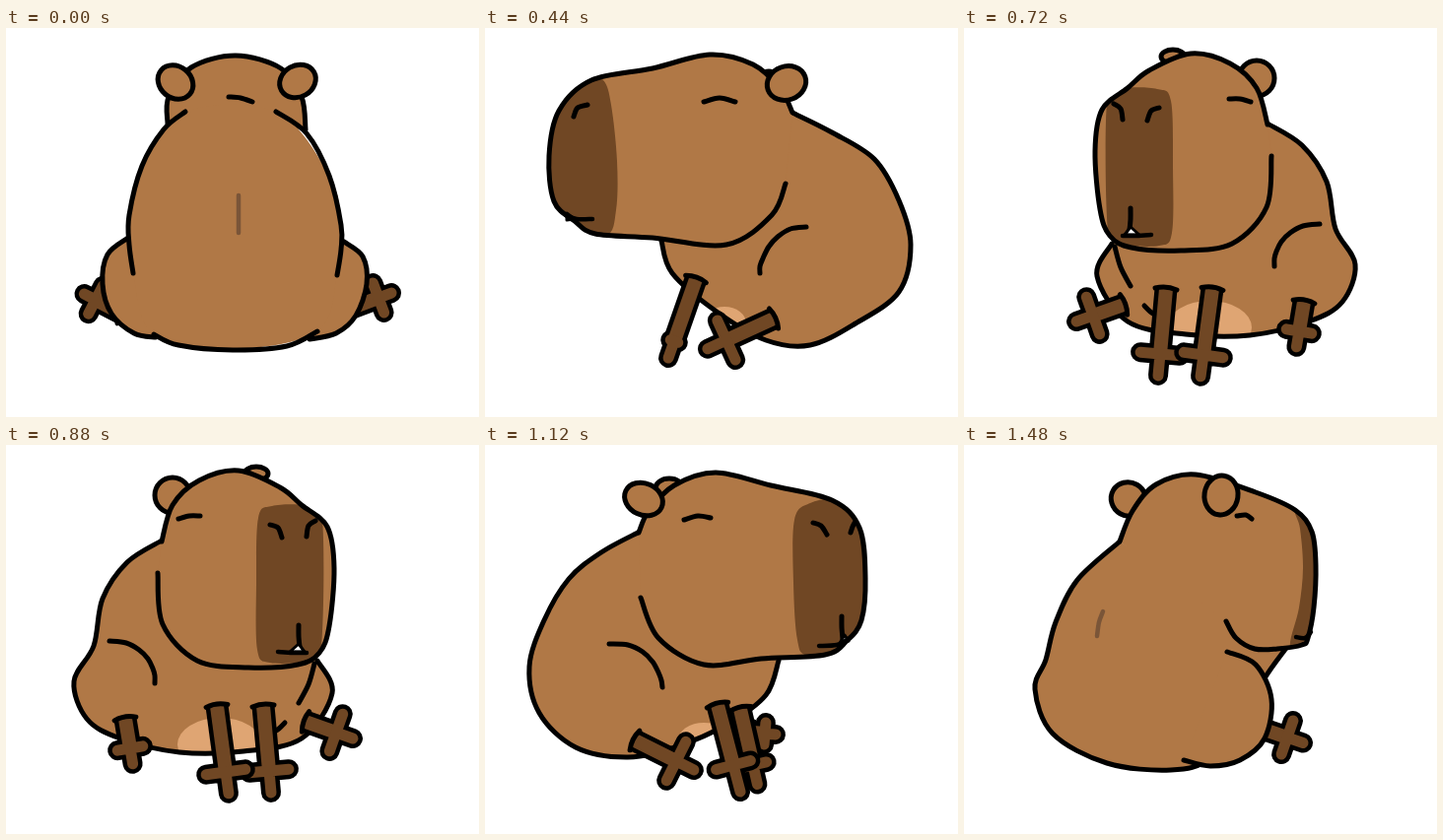
These frames come from a looping animation (480 px wide and 395 px high, 1560 ms). An HTML page with a canvas:

```html
<!DOCTYPE html>
<html lang="en">
<head>
<meta charset="utf-8">
<title>Spinning capybara</title>
<style>
html, body { margin: 0; width: 100%; height: 100%; overflow: hidden; background: #fff; }
canvas { display: block; }
</style>
</head>
<body>
<canvas id="c" width="480" height="395"></canvas>
<script>
const ctx = document.getElementById('c').getContext('2d');
const FUR = '#b07846', DARK = '#704724', BELLY = '#dfa573', MARK = '#7a5538', INK = '#000';
const AXIS = 466; // mirrored x = AXIS - x

// Poses of the left-facing half turn; "at" is the drawing step.
// Ears and belly: cx,cy rx,ry tilt. Legs: top, paw centre, toe lengths (front,side).
const poses = [
  { at: 1, flip: 1, back: 1,
    body: '158,98 115,137 93,180 83,218 72,248 90,293 145,323 210,330 250,318 290,270 305,237 327,206',
    thigh: '267,210 296,223 312,258 305,298 280,320 250,326 223,320',
    head: '266,179 276,196 295,207 318,207 343,203 349,196 355,165 357,122 353,88 336,66 296,48 235,30 195,40 171,67 158,98',
    snout: '350,60 336,66 341,85 344,125 340,165 331,206 350,215 370,190 370,85',
    eye: '277,72 286,71 292,75', mouth: '352,190 346,196 337,195', mark: '141,169 137,180 135,194',
    near: '261,51 17,20 8,0', far: '167,55 18,17 30,0',
    legC: '302,288 328,297 17,18' },
  { at: 4, back: 1,
    body: '309,90 348,111 385,147 404,205 405,262 376,304 325,328 272,329 230,300 205,275 186,256 156,211',
    thigh: '240,210 207,220 189,255 191,297 218,323 250,327 280,321',
    head: '236,156 228,183 203,208 165,210 122,208 104,197 87,180 82,138 88,90 116,58 172,44 215,29 262,34 297,63 310,92',
    snout: '100,45 118,50 117,75 114,120 118,170 126,212 90,225 60,190 65,80',
    eye: '193,72 206,68 219,73', nose1: '107,77 99,79 95,87', mouth: '92,191 104,194 116,193',
    tooth: '93,186 93,194 100,193', mark: '369,153 377,170 383,187',
    near: '243,53 17,20 0,0', far: '303,53 18,17 -20,0',
    legB: '180,245 180,290 6,0', legC: '202,296 172,302 17,20' },
  { at: 8,
    body: '312,86 352,106 395,133 420,175 432,220 420,268 376,300 330,322 285,317 235,288 190,249 179,216',
    thigh: '326,202 310,204 297,212 288,222 282,234 279,242 279,249',
    head: '305,158 291,190 245,220 170,213 112,209 91,196 70,176 65,130 75,84 108,53 170,41 228,27 272,37 300,62 312,86',
    snout: '100,45 120,53 128,78 134,135 133,185 122,212 75,215 55,170 55,85',
    eye: '222,75 238,71 254,75', nose1: '104,78 94,81 90,90', mouth: '82,190 93,194 109,194',
    tooth: '83,188 83,195 91,194',
    near: '306,56 20,17 -20,0', far: '288,54 10,10 0,0', belly: '243,300 22,17 0,0',
    legB: '214,255 192,318 18,4', legC: '293,295 245,317 21,22' },
  { at: 9, flip: 1,
    body: '157,88 118,109 85,136 60,178 45,225 55,272 92,307 145,317 195,306 245,284 285,254 298,219',
    thigh: '126,202 145,203 160,210 170,220 176,231 179,239 180,246',
    head: '158,155 176,196 222,223 280,217 345,213 367,199 382,178 386,135 380,84 352,56 290,41 234,28 192,41 166,67 156,89',
    snout: '360,56 330,59 314,76 313,140 317,198 328,214 372,216 398,175 395,75',
    eye: '202,76 216,72 229,74', nose1: '333,79 341,82 347,91', nose2: '375,79 373,83 371,89',
    lip: '362,174 362,185 363,197', mouth: '367,198 357,203 339,204', tooth: '365,193 360,201 369,199',
    near: '161,55 20,16 25,0', far: '187,44 14,10 0,0', belly: '222,300 26,18 0,0',
    legA: '259,268 272,325 20,14', legB: '236,264 252,325 28,18',
    legC: '152,300 194,321 20,22', legD: '272,292 284,293 11,11' },
  { at: 14, hind: 1,
    body: '308,97 343,119 368,156 377,204 397,240 384,278 350,298 290,312 225,311 166,298 135,252 150,219',
    thigh: '361,199 344,201 331,208 322,217 317,227 315,234 315,242', thigh2: '153,222 159,243 169,262',
    fold: '183,282 189,288 195,292',
    head: '312,130 307,182 272,219 220,226 170,223 148,211 138,184 133,125 140,83 166,61 188,43 230,26 270,36 297,61 308,98',
    snout: '160,62 196,62 210,74 212,140 211,208 198,221 160,219 146,205 145,76',
    eye: '269,72 280,72 291,75', nose1: '198,81 190,84 186,94', nose2: '152,77 159,82 161,93',
    lip: '169,183 169,194 168,205', mouth: '161,211 175,211 190,210', tooth: '169,202 163,210 178,210',
    near: '297,51 18,18 0,0', far: '212,29 12,7 0,0', belly: '249,304 43,27 0,0',
    legA: '205,265 199,331 22,20', legB: '252,265 243,332 22,20',
    legC: '345,278 340,308 16,13', legD: '162,281 131,292 18,20' },
  { at: 15.5, hind: 1,
    body: '306,110 318,130 330,165 338,206 364,243 352,283 315,303 260,313 206,313 130,293 102,243 150,205',
    thigh: '345,203 331,206 320,212 311,221 306,229 303,237 302,244', thigh2: '148,218 155,232 164,246',
    head: '323,120 316,180 282,217 233,226 184,217 155,195 145,165 143,125 150,90 160,68 186,41 233,26 280,41 306,68 318,98',
    snout: '215,62 251,62 266,75 267,140 266,207 252,221 214,221 200,207 199,75',
    eye: '283,73 293,73 302,76', eye2: '183,73 173,73 164,76',
    nose1: '256,80 249,84 246,93', nose2: '210,80 217,84 220,93',
    lip: '233,183 233,194 233,205', mouth: '220,211 233,211 246,211', tooth: '233,202 226,210 240,210',
    near: '285,42 18,17 0,0', far: '181,42 18,17 0,0', belly: '233,304 44,27 0,0',
    legA: '206,266 205,330 23,20', legB: '260,266 261,330 23,20',
    legC: '325,278 345,308 18,16', legD: '141,278 121,308 18,16' }
];

const pts = s => s.split(' ').map(p => p.split(',').map(Number));

const isOval = k => /near|far|belly/.test(k);
for (const p of poses)
  for (const k in p) {
    if (typeof p[k] !== 'string') continue;
    const list = p[k] = pts(p[k]);
    if (!p.flip) continue;
    const n = isOval(k) ? 1 : k.startsWith('leg') ? 2 : list.length;
    for (let i = 0; i < n; i++) list[i][0] = AXIS - list[i][0];
    if (isOval(k)) list[2][0] *= -1;
  }

function poseAt(n) {
  let i = 0;
  while (i < poses.length - 2 && n >= poses[i + 1].at) i++;
  const a = poses[i], b = poses[i + 1], f = (n - a.at) / (b.at - a.at);
  const close = f < .5 ? a : b, out = {};
  for (const k in close)
    out[k] = Array.isArray(close[k]) && a[k] && b[k]
      ? a[k].map(([x, y], j) => [x + (b[k][j][0] - x) * f, y + (b[k][j][1] - y) * f])
      : close[k];
  return out;
}

// Catmull-Rom spline through the points
function curve(p, closed) {
  const n = p.length, path = new Path2D();
  const at = i => closed ? p[(i + n) % n] : p[Math.max(0, Math.min(n - 1, i))];
  path.moveTo(...p[0]);
  for (let i = 0; i < (closed ? n : n - 1); i++) {
    const [a, b, c, d] = [at(i - 1), at(i), at(i + 1), at(i + 2)];
    path.bezierCurveTo(b[0] + (c[0] - a[0]) / 6, b[1] + (c[1] - a[1]) / 6,
      c[0] - (d[0] - b[0]) / 6, c[1] - (d[1] - b[1]) / 6, c[0], c[1]);
  }
  return path;
}

function paint(path, fill, ink = INK, width = 5) {
  if (fill) { ctx.fillStyle = fill; ctx.fill(path); }
  if (ink) { ctx.strokeStyle = ink; ctx.lineWidth = width; ctx.stroke(path); }
}

const line = (p, ink, width) => p && paint(curve(p), null, ink, width);

function oval([[x, y], [rx, ry], [tilt]]) {
  const path = new Path2D();
  path.ellipse(x, y, rx, ry, tilt * Math.PI / 180, 0, 7);
  return path;
}

const ear = e => e && paint(oval(e), FUR);

function inside(clip, path, fill) {
  ctx.save();
  ctx.clip(clip);
  paint(path, fill, null);
  ctx.restore();
}

function leg(l) {
  if (!l) return;
  const [[x, y], [px, py], [front, side]] = l;
  const dir = Math.atan2(py - y, px - x), c = Math.cos(dir), s = Math.sin(dir);
  const shin = new Path2D(), toes = new Path2D(), top = new Path2D();
  shin.moveTo(x, y);
  shin.lineTo(px, py);
  for (const [turn, len] of [[-1.57, side], [0, front], [1.57, side]]) {
    toes.moveTo(px, py);
    toes.lineTo(px + Math.cos(dir + turn) * len, py + Math.sin(dir + turn) * len);
  }
  for (const [ink, w] of [[INK, 20], [DARK, 11]]) {
    ctx.lineCap = 'butt';
    paint(shin, null, ink, w + 3);
    ctx.lineCap = 'round';
    paint(toes, null, ink, w);
  }
  top.moveTo(x - s * 11, y + c * 11);
  top.quadraticCurveTo(x - c * 4, y - s * 4, x + s * 11, y - c * 11);
  paint(top, null);
}

function drawTurn(p) {
  const legs = () => [p.legD, p.legA, p.legB, p.legC].forEach(leg);
  const body = curve(p.body), head = curve(p.head);
  if (p.back) legs();
  paint(body, FUR, null);
  if (p.belly) inside(body, oval(p.belly), BELLY);
  paint(body, null);
  paint(curve(p.thigh), p.back ? FUR : null);
  line(p.thigh2);
  line(p.fold);
  line(p.mark, MARK, 4.5);
  if (!p.back) legs();
  ear(p.far);
  if (p.hind) ear(p.near);
  paint(head, FUR, null);
  inside(head, curve(p.snout, true), DARK);
  paint(head, null);
  for (const k of ['eye', 'eye2', 'nose1', 'nose2', 'lip']) line(p[k]);
  if (p.tooth) {
    const t = new Path2D();
    p.tooth.forEach(q => t.lineTo(...q));
    t.closePath();
    paint(t, '#fff', INK, 3);
  }
  line(p.mouth, INK, 4.5);
  if (!p.hind) ear(p.near);
}

function drawBack() {
  leg(pts('118,290 91,276 13,16'));
  leg(pts('346,286 378,274 14,16'));
  paint(curve(pts('164,97 165,70 188,40 233,28 279,41 300,70 304,103')), FUR);
  paint(curve(pts('124,213 103,230 98,260 107,290 130,310 152,314')), FUR);
  paint(curve(pts('343,217 362,232 366,260 355,292 335,310 308,316')), FUR);
  paint(curve(pts('182,85 138,140 125,200 129,249 150,312 230,326 316,308 336,251 340,200 328,150 274,85'), true), FUR, null);
  line(pts('182,85 160,103 138,140 125,190 125,220 129,249'));
  line(pts('274,85 305,107 328,150 340,200 340,225 336,251'));
  line(pts('150,311 175,322 230,327 285,323 316,308'));
  line(pts('236,170 236,208'), MARK, 4.5);
  line(pts('226,70 238,71 250,75'));
  ear(pts('172,55 19,16 40,0'));
  ear(pts('296,54 19,16 -30,0'));
}

// 40 ms slots; the rest are held drawings
const starts = [];
for (let k = 0; k < 39; k++) {
  const held = k < 3 ? k > 0 : k === 38 || (k > 6 && k < 32 && k % 6 === 1);
  if (!held) starts.push(k * 40);
}

let shown = -1;
function frame(now) {
  const t = now % 1560;
  let n = starts.length - 1;
  while (starts[n] > t) n--;
  if (n !== shown) {
    shown = n;
    ctx.setTransform(1, 0, 0, 1, 0, 0);
    ctx.fillStyle = '#fff';
    ctx.fillRect(0, 0, 480, 395);
    ctx.lineCap = ctx.lineJoin = 'round';
    if (n === 0) drawBack();
    else {
      const mirrored = n > 15;
      if (mirrored) ctx.setTransform(-1, 0, 0, 1, AXIS, 0);
      drawTurn(poseAt(mirrored ? 31 - n : n));
    }
  }
  requestAnimationFrame(frame);
}
frame(performance.now());
</script>
</body>
</html>
```
